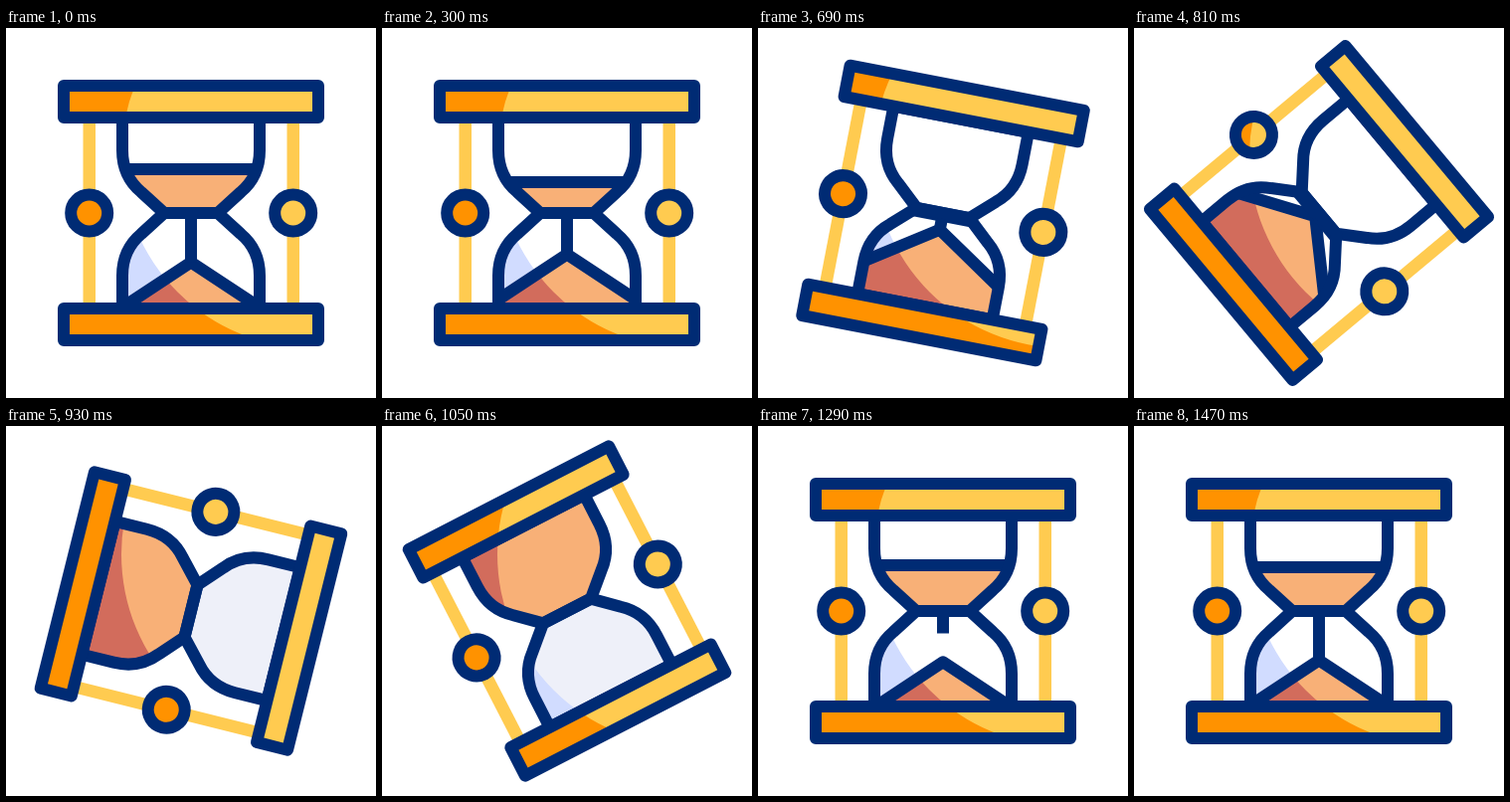
These frames come from a looping animation (372x372 px, 1500 ms). An HTML page with a canvas:

```html
<!DOCTYPE html>
<html lang="en">
<head>
<meta charset="utf-8">
<title>Hourglass</title>
<style>
  html, body { margin: 0; width: 100%; height: 100%; overflow: hidden; background: #fff; }
  canvas { display: block; width: 372px; height: 372px; }
</style>
</head>
<body>
<canvas id="stage"></canvas>
<script>
const SIZE = 372, MID = 186, LOOP = 1500, STEP = 30;
const FLIP = 930; // from here on the upper and lower glass swap roles

const NAVY = '#002b74';
const YELLOW = '#ffcb50';
const ORANGE = '#ff9200';
const SAND = ['#f8b077', '#d26c5c'];
const BRASS = [YELLOW, ORANGE];

const canvas = document.getElementById('stage');
const ctx = canvas.getContext('2d');
const dpr = window.devicePixelRatio || 1;
canvas.width = canvas.height = SIZE * dpr;

// Shadow is everything outside a big circle that stays put on screen.
const shadow = new Path2D();
shadow.rect(-50, -50, 700, 500);
shadow.arc(309, 129, 193, 0, Math.PI * 2);

const upper = new Path2D('M117 90V123C117 142 124 155 136 165L159 186H213L236 165C248 155 255 142 255 123V90Z');
const lower = new Path2D('M117 282V249C117 230 124 217 136 207L159 186H213L236 207C248 217 255 230 255 249V282Z');
const both = new Path2D(upper);
both.addPath(lower);

const knobs = [83.7, 288.7].map(x => {
  const p = new Path2D();
  p.arc(x, MID, 18.5, 0, Math.PI * 2);
  return p;
});

function bar(y, inset) {
  const p = new Path2D();
  p.rect(58 + inset, y, 256 - 2 * inset, 32);
  return p;
}

// [time, value] tables
const LEVEL = [[180, 142], [590, 186], [690, 189]];
const PEAK = [[180, 235.5], [300, 227.5], [690, 203], [810, 191], [930, 160]];

function track(keys, t) {
  if (t <= keys[0][0]) return keys[0][1];
  for (let i = 1; i < keys.length; i++) {
    const [t0, a] = keys[i - 1], [t1, b] = keys[i];
    if (t <= t1) return a + (b - a) * (t - t0) / (t1 - t0);
  }
  return keys[keys.length - 1][1];
}

const progress = (t, from, to) => Math.min(1, Math.max(0, (t - from) / (to - from)));
const ease = (t, from, to) => (1 - Math.cos(Math.PI * progress(t, from, to))) / 2;

function pose(t) {
  const turn = 180 * ease(t, 593, 1206);
  const inset = 16 * (ease(t, 593, 783) - ease(t, 1016, 1206));
  if (t < FLIP) {
    return { angle: turn, inset, level: track(LEVEL, t), peak: track(PEAK, t), stream: 1 };
  }
  const left = (1 - progress(t, 1049, 1470)) ** 4;
  return {
    angle: turn - 180,
    inset,
    level: 142 - 58 * left,
    peak: 235.5 + 54 * left,
    stream: 1 - (1 - progress(t, 1230, 1470)) ** 2
  };
}

function view(angle) {
  ctx.setTransform(dpr, 0, 0, dpr, 0, 0);
  ctx.translate(MID, MID);
  ctx.rotate(angle * Math.PI / 180);
  ctx.translate(-MID, -MID);
}

function tint(path, [light, dark], angle) {
  ctx.fillStyle = light;
  ctx.fill(path);
  ctx.save();
  ctx.clip(path);
  view(0);
  ctx.fillStyle = dark;
  ctx.fill(shadow, 'evenodd');
  ctx.restore();
  view(angle);
}

function within(path, paint) {
  ctx.save();
  ctx.clip(path);
  paint();
  ctx.restore();
}

function line(x0, y0, x1, y1) {
  ctx.beginPath();
  ctx.moveTo(x0, y0);
  ctx.lineTo(x1, y1);
  ctx.stroke();
}

function draw(t) {
  const { angle, inset, level, peak, stream } = pose(t);
  const glass = [t >= 870 && t < 1230 ? '#eef0f9' : '#ffffff', '#d1dcff'];

  view(0);
  ctx.fillStyle = '#fff';
  ctx.fillRect(0, 0, SIZE, SIZE);
  view(angle);
  ctx.lineWidth = 12;
  ctx.lineJoin = 'round';
  ctx.strokeStyle = NAVY;

  ctx.fillStyle = YELLOW;
  for (const x of [77.5, 282.5]) ctx.fillRect(x, 90, 12.5, 192);

  tint(upper, glass, angle);
  tint(lower, glass, angle);

  within(upper, () => {
    const fill = new Path2D();
    fill.rect(100, level, 172, Math.max(0, MID - level));
    tint(fill, SAND, angle);
  });

  within(lower, () => {
    const drop = 100 * 0.66;
    const pile = new Path2D();
    pile.moveTo(MID - 100, peak + drop);
    pile.lineTo(MID, peak);
    pile.lineTo(MID + 100, peak + drop);
    pile.lineTo(MID + 100, 400);
    pile.lineTo(MID - 100, 400);
    pile.closePath();
    tint(pile, SAND, angle);
    ctx.stroke(pile);
    if (stream > 0 && peak > MID) line(MID, MID, MID, MID + (peak - MID) * stream);
  });

  within(both, () => line(100, level, 272, level));

  ctx.stroke(upper);
  ctx.stroke(lower);
  for (const part of [bar(58, inset), bar(282, inset), ...knobs]) {
    tint(part, BRASS, angle);
    ctx.stroke(part);
  }
}

const start = performance.now();

function tick() {
  const t = (performance.now() - start + 1) % LOOP;
  draw(Math.floor(t / STEP) * STEP);
  requestAnimationFrame(tick);
}
tick();
</script>
</body>
</html>
```
